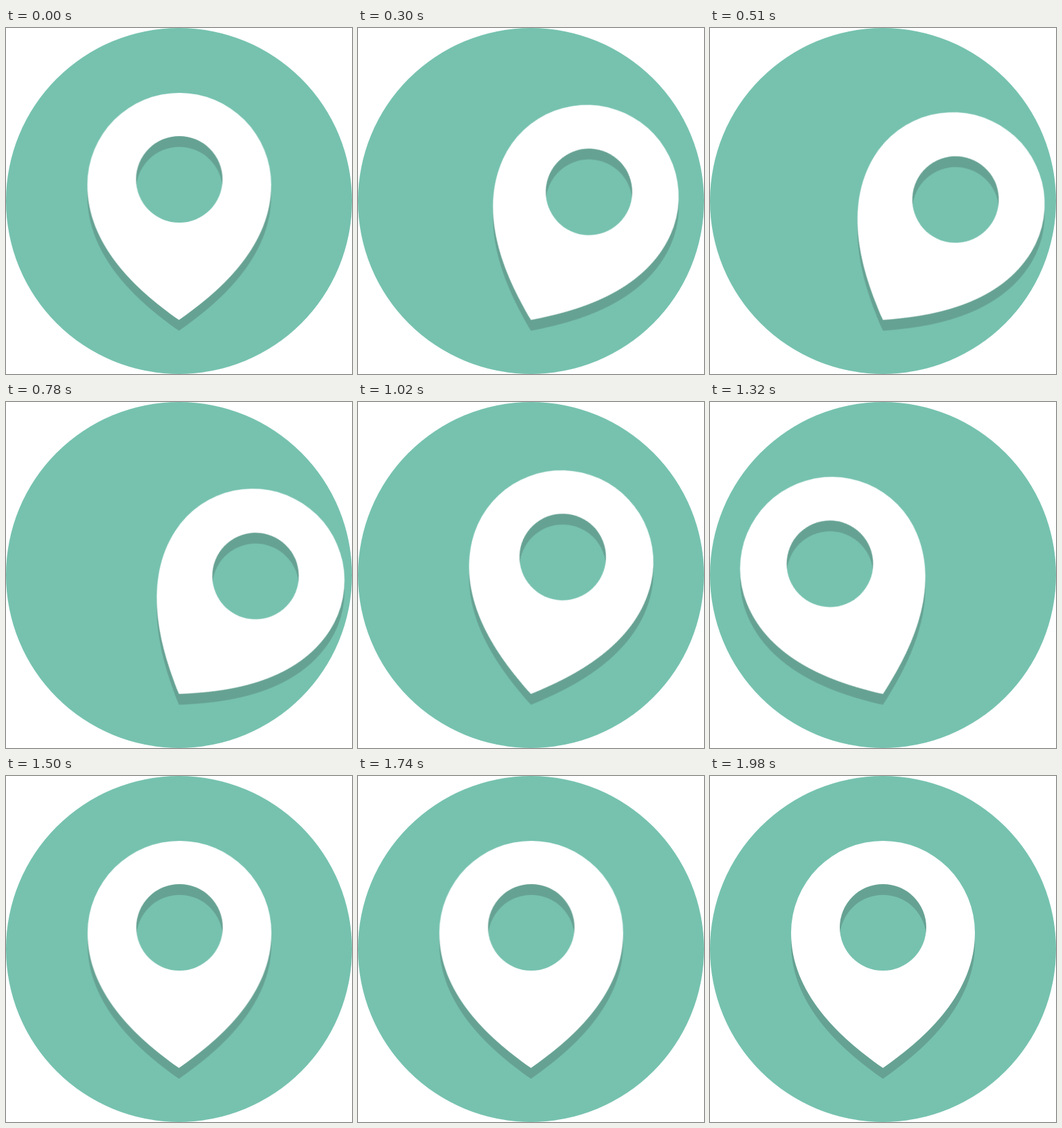
An HTML page without scripts that plays this animation: 512x512 px, repeating every 2.01 s.

```html
<!DOCTYPE html>
<html lang="en">
<head>
<meta charset="utf-8">
<title>Swinging map pin</title>
<style>
  html, body { margin: 0; width: 100%; height: 100%; overflow: hidden; background: #fff; }
  svg { display: block; width: 100%; height: 100%; }

  /* The pin swings around its tip; the shadow keeps a fixed drop. */
  .pin {
    transform-origin: 256px 432px;
    animation: swing 2010ms infinite;
  }

  @keyframes swing {
    0%     { transform: rotate(0deg);    animation-timing-function: cubic-bezier(.333, 1, .667, 1); }
    41.54% { transform: rotate(33deg);   animation-timing-function: cubic-bezier(.728, 0, .38, 1); }
    61.2%  { transform: rotate(-31deg);  animation-timing-function: cubic-bezier(.45, 0, .3, 1); }
    75.6%  { transform: rotate(.3deg);   animation-timing-function: ease-out; }
    100%   { transform: rotate(0deg); }
  }
</style>
</head>
<body>
<svg viewBox="0 0 512 512">
  <defs>
    <path id="shape" fill-rule="evenodd" d="M256 96A136 136 0 0 0 120 232C120 320 190 386 256 432C322 386 392 320 392 232A136 136 0 0 0 256 96ZM256 160a64 64 0 0 1 0 128a64 64 0 0 1 0-128Z"/>
  </defs>
  <circle cx="256" cy="256" r="256" fill="#76c2af"/>
  <g transform="translate(0 16)" fill="#231f20" opacity=".2">
    <g class="pin"><use href="#shape"/></g>
  </g>
  <g class="pin" fill="#fff"><use href="#shape"/></g>
</svg>
</body>
</html>
```
